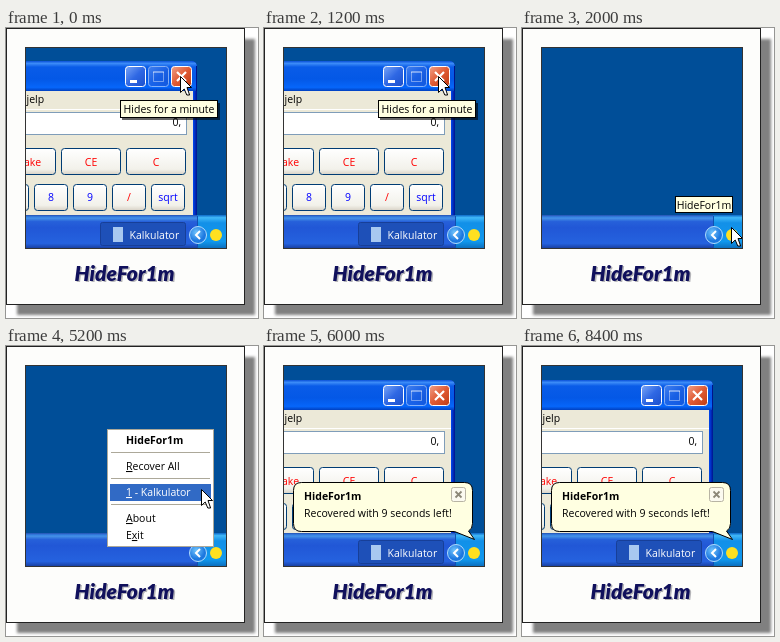
Animation of 252x290 px, one loop 10 s. Source, as an HTML page:

```html
<!DOCTYPE html>
<html lang="en">
<head>
<meta charset="utf-8">
<title>HideFor1m</title>
<style>
  html, body { margin: 0; width: 100%; height: 100%; overflow: hidden; background: #fff; }
  svg { display: block; width: 252px; height: 290px; }
  text { font: 10.5px "Open Sans", "Noto Sans", sans-serif; fill: #000; }
  .bold { font-weight: 700; }
  .mid { text-anchor: middle; }
  .end { text-anchor: end; }
  .red { fill: #f00; }
  .blue { fill: #00f; }
  .white { fill: #fff; }
  .caption { font: italic 900 21px Lato, "Open Sans", sans-serif; }
  .key { fill: url(#key); stroke: #003c74; }
  .tip { fill: #ffffe1; stroke: #000; }
  .line { stroke: #aca899; }
  .scene { animation: 10s step-end infinite; }
  .window { animation-name: window; }
  .task { animation-name: task; }
  .hover { animation-name: first; }
  .tray { animation-name: second; }
  .menu { animation-name: third; }
  .balloon { animation-name: fourth; }
  /* the window comes back one pixel lower */
  @keyframes window {
    0% { opacity: 1; transform: none; }
    20% { opacity: 0; transform: none; }
    60%, 100% { opacity: 1; transform: translateY(1px); }
  }
  @keyframes task { 0% { opacity: 1; } 20% { opacity: 0; } 60%, 100% { opacity: 1; } }
  @keyframes first { 0% { opacity: 1; } 20%, 100% { opacity: 0; } }
  @keyframes second { 0% { opacity: 0; } 20% { opacity: 1; } 40%, 100% { opacity: 0; } }
  @keyframes third { 0% { opacity: 0; } 40% { opacity: 1; } 60%, 100% { opacity: 0; } }
  @keyframes fourth { 0% { opacity: 0; } 60%, 100% { opacity: 1; } }
</style>
</head>
<body>
<svg viewBox="0 0 252 290">
  <defs>
    <linearGradient id="title" x2="0" y2="1">
      <stop offset="0" stop-color="#0a50d8"/>
      <stop offset=".08" stop-color="#3c8cf8"/>
      <stop offset=".2" stop-color="#0a5ce8"/>
      <stop offset=".6" stop-color="#0458e6"/>
      <stop offset=".88" stop-color="#0666fa"/>
      <stop offset="1" stop-color="#0040c0"/>
    </linearGradient>
    <linearGradient id="edge" gradientUnits="userSpaceOnUse" x1="187" x2="191">
      <stop offset="0" stop-color="#0048f1"/>
      <stop offset="1" stop-color="#00138c"/>
    </linearGradient>
    <linearGradient id="bar" x2="0" y2="1">
      <stop offset="0" stop-color="#2450b0"/>
      <stop offset=".06" stop-color="#3682e5"/>
      <stop offset=".1" stop-color="#4490e6"/>
      <stop offset=".2" stop-color="#2660da"/>
      <stop offset=".38" stop-color="#2157d6"/>
      <stop offset=".86" stop-color="#2562df"/>
      <stop offset="1" stop-color="#1941a5"/>
    </linearGradient>
    <linearGradient id="notify" x2="0" y2="1">
      <stop offset="0" stop-color="#0c68c8"/>
      <stop offset=".08" stop-color="#40b8f8"/>
      <stop offset=".24" stop-color="#1290e8"/>
      <stop offset=".8" stop-color="#1098ee"/>
      <stop offset="1" stop-color="#0c70c0"/>
    </linearGradient>
    <linearGradient id="key" x2="0" y2="1">
      <stop offset="0" stop-color="#fff"/>
      <stop offset=".8" stop-color="#f2f1ea"/>
      <stop offset="1" stop-color="#d8d2c6"/>
    </linearGradient>
    <linearGradient id="cap" x2="1" y2="1">
      <stop offset="0" stop-color="#7ba6f6"/>
      <stop offset=".5" stop-color="#2f68e4"/>
      <stop offset="1" stop-color="#1c50cc"/>
    </linearGradient>
    <linearGradient id="close" x2="1" y2="1">
      <stop offset="0" stop-color="#f0a088"/>
      <stop offset=".5" stop-color="#e05a34"/>
      <stop offset="1" stop-color="#c03c14"/>
    </linearGradient>
    <radialGradient id="knob" cx=".4" cy=".35">
      <stop offset="0" stop-color="#70c4fc"/>
      <stop offset="1" stop-color="#1c78e0"/>
    </radialGradient>
    <filter id="blur" x="-10%" y="-10%" width="120%" height="120%">
      <feGaussianBlur stdDeviation="1.6"/>
    </filter>
    <clipPath id="photo"><path d="M20 20H220V220H20Z"/></clipPath>
    <path id="arrow" d="M.5 .5V16.5L4.2 13L6.8 19H9.6L7 11.5H11.5Z" fill="#fff" stroke="#000"/>
  </defs>

  <rect width="252" height="290" fill="#fff"/>
  <rect x="11" y="11" width="238" height="276" fill="#808080" filter="url(#blur)"/>
  <rect x=".5" y=".5" width="238" height="276" fill="#fdfdfb" stroke="#222"/>
  <text class="caption mid" x="120" y="254" style="fill:#b4b4b8">HideFor1m</text>
  <text class="caption mid" x="118.5" y="252.5" style="fill:#10105c">HideFor1m</text>

  <g clip-path="url(#photo)">
    <rect x="20" y="20" width="200" height="200" fill="#004e98"/>

    <g class="scene window">
      <path d="M10 33H185Q191 33 191 39V190H10Z" fill="url(#edge)"/>
      <path d="M10 33H185Q191 33 191 39V63H10Z" fill="url(#title)"/>
      <path d="M190.5 38V63" stroke="#00138c"/>
      <rect x="10" y="63" width="177" height="120" fill="#ece9d8"/>
      <rect x="10" y="183" width="177" height="5" fill="#ece9d8"/>
      <g stroke="#fff">
        <rect x="119.5" y="38.5" width="20" height="20" rx="3" fill="url(#cap)"/>
        <rect x="142.5" y="38.5" width="20" height="20" rx="3" fill="url(#cap)" opacity=".5"/>
        <rect x="165.5" y="38.5" width="20" height="20" rx="3" fill="url(#close)"/>
        <path d="M124 53.5H131" stroke-width="3"/>
        <path d="M171 44L180 53M180 44L171 53" stroke-width="2.2"/>
        <path d="M147.5 43.5H157.5V53.5H147.5ZM147 44.5H158" fill="none" opacity=".4"/>
      </g>
      <text x="20.5" y="75">jelp</text>
      <path d="M20 81.5H187" stroke="#fff"/>
      <rect x="10.5" y="84.5" width="170" height="22" fill="#fff" stroke="#7f9db9"/>
      <text class="end" x="175" y="98">0,</text>

      <rect class="key" x="-9.5" y="120.5" width="59" height="26" rx="3"/>
      <rect class="key" x="55.5" y="120.5" width="59" height="26" rx="3"/>
      <rect class="key" x="120.5" y="120.5" width="59" height="26" rx="3"/>
      <text class="red" x="18" y="138">ake</text>
      <text class="red mid" x="85" y="138">CE</text>
      <text class="red mid" x="150" y="138">C</text>

      <rect class="key" x="-9.5" y="156.5" width="32" height="26" rx="3"/>
      <rect class="key" x="28.5" y="156.5" width="33" height="26" rx="3"/>
      <rect class="key" x="67.5" y="156.5" width="33" height="26" rx="3"/>
      <rect class="key" x="106.5" y="156.5" width="33" height="26" rx="3"/>
      <rect class="key" x="145.5" y="156.5" width="33" height="26" rx="3"/>
      <text class="blue mid" x="45" y="173">8</text>
      <text class="blue mid" x="84" y="173">9</text>
      <text class="red mid" x="123" y="173">/</text>
      <text class="blue mid" x="162" y="173">sqrt</text>
    </g>

    <rect x="20" y="187" width="200" height="33" fill="url(#bar)"/>
    <g class="scene task">
      <rect x="94.5" y="194.5" width="85" height="23" rx="2" fill="#1e50b8" stroke="#173f98"/>
      <rect x="107" y="199" width="10" height="15" fill="#a8c8f0"/>
      <text class="white" x="123.5" y="211">Kalkulator</text>
    </g>
    <rect x="191" y="187" width="29" height="33" fill="url(#notify)"/>
    <path d="M191.5 188V220" stroke="#1050b0"/>
    <circle cx="192" cy="207" r="8.5" fill="url(#knob)" stroke="#b0dcfc"/>
    <path d="M194 203L190 207L194 211" fill="none" stroke="#fff" stroke-width="2"/>
    <circle cx="210" cy="207" r="6" fill="#ffe020"/>

    <g class="scene hover">
      <rect x="116" y="75" width="98" height="17" opacity=".6"/>
      <rect class="tip" x="114.5" y="72.5" width="97" height="17"/>
      <text class="mid" x="163" y="85">Hides for a minute</text>
      <use href="#arrow" x="174" y="48"/>
    </g>

    <g class="scene tray">
      <rect class="tip" x="153.5" y="168.5" width="57" height="16"/>
      <text class="mid" x="182" y="180.5">HideFor1m</text>
      <use href="#arrow" x="209" y="199"/>
    </g>

    <g class="scene menu">
      <rect x="101.5" y="83.5" width="106" height="117" fill="#fff" stroke="#aca899"/>
      <text class="bold" x="120" y="98">HideFor1m</text>
      <path class="line" d="M105 106.5H204M105 132.5H204M105 158.5H204"/>
      <text x="120" y="124"><tspan text-decoration="underline">R</tspan>ecover All</text>
      <rect x="104" y="138" width="101" height="17" fill="#316ac5"/>
      <text class="white" x="120" y="150"><tspan text-decoration="underline">1</tspan> - Kalkulator</text>
      <text x="120" y="176"><tspan text-decoration="underline">A</tspan>bout</text>
      <text x="120" y="193">E<tspan text-decoration="underline">x</tspan>it</text>
      <use href="#arrow" x="195" y="143"/>
    </g>

    <g class="scene balloon">
      <path class="tip" d="M37.5 136.5H200.5Q208.5 136.5 208.5 144.5V177.5Q208.5 183 204.5 185L210.5 193.5L190.5 185.5H37.5Q29.5 185.5 29.5 177.5V144.5Q29.5 136.5 37.5 136.5Z"/>
      <text class="bold" x="40" y="154">HideFor1m</text>
      <text x="40" y="171">Recovered with 9 seconds left!</text>
      <rect x="187.5" y="141.5" width="14" height="14" rx="2" fill="#fbfaf0" stroke="#b8b4a4"/>
      <path d="M191.5 145.5L197.5 151.5M197.5 145.5L191.5 151.5" stroke="#8c8878" stroke-width="1.8"/>
    </g>
  </g>
  <rect x="19.5" y="19.5" width="201" height="201" fill="none" stroke="#333"/>
</svg>
</body>
</html>
```
